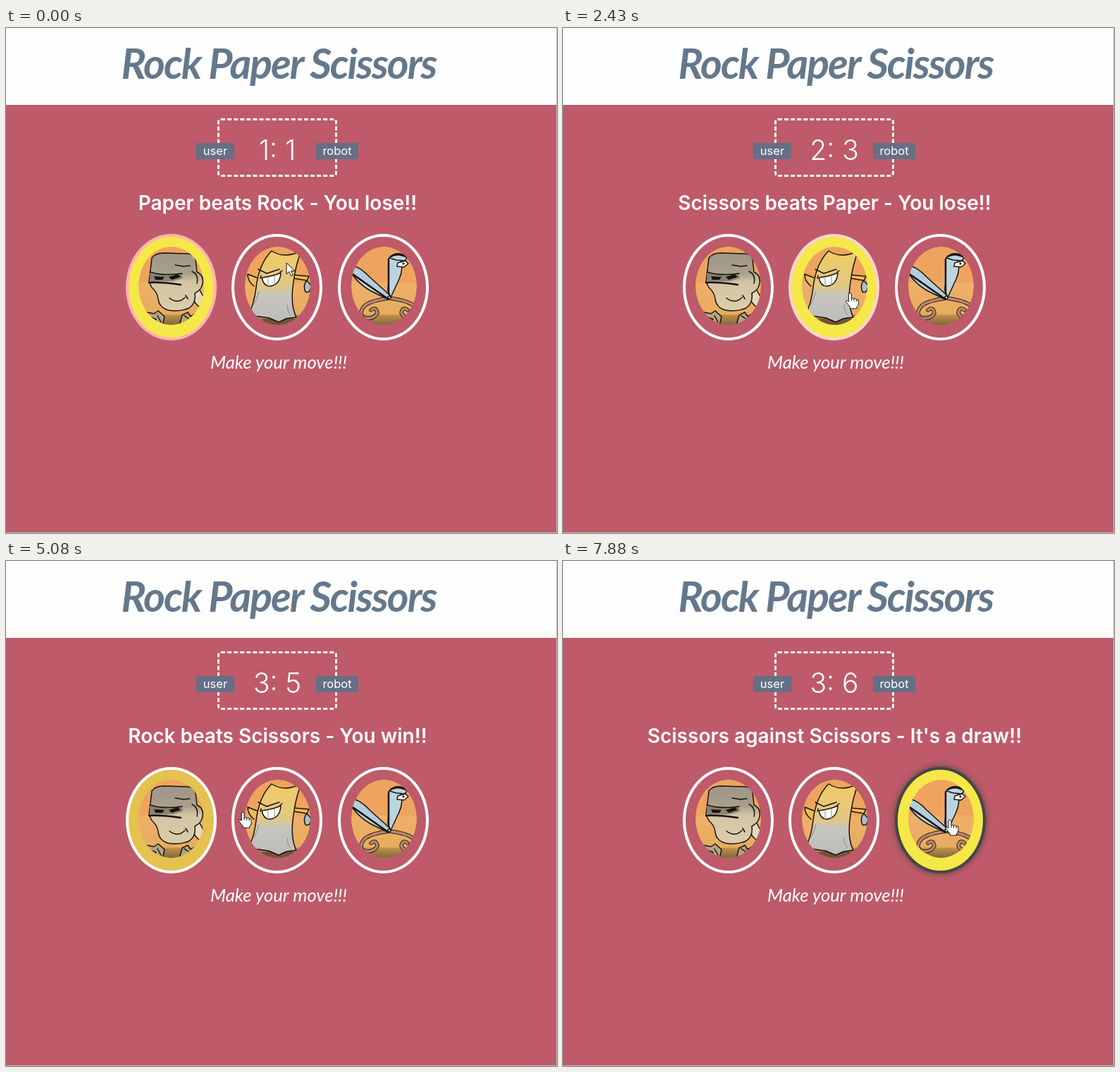
An HTML page that plays this animation: 782 by 716 pixels, repeating every 8000 ms.

```html
<!DOCTYPE html>
<html lang="en">
<head>
<meta charset="utf-8">
<title>Rock Paper Scissors</title>
<style>
html, body { margin: 0; width: 100%; height: 100%; overflow: hidden; background: #be5a69; }
#stage { position: relative; width: 782px; height: 716px; overflow: hidden; }
#stage > * { position: absolute; box-sizing: border-box; }
header { width: 782px; height: 109px; background: #fefefe; }
.board { left: 300px; top: 128px; width: 170px; height: 83px; border: 3px dashed #fff; border-radius: 5px; }
.choice { top: 292px; width: 129px; height: 151px; border: 4px solid #fff; border-radius: 50%; }
svg { left: 0; top: 0; }
text { fill: #fff; text-anchor: middle; font: 600 28px Inter, sans-serif; }
.script { font: italic 25.7px Caveat, Lato, cursive; }
#title { fill: #64788c; font-size: 59px; font-weight: 700; letter-spacing: -2px; }
#score { font-size: 39px; font-weight: 300; }
.label { font-size: 16.5px; font-weight: 400; }
.ink { stroke: #17130f; stroke-width: 1.5; stroke-linejoin: round; stroke-linecap: round; }
.line { fill: none; }
</style>
</head>
<body>
<div id="stage">
  <header></header>
  <div class="board"></div>
  <div class="choice" style="left:170px"></div>
  <div class="choice" style="left:320px"></div>
  <div class="choice" style="left:471px"></div>
  <svg width="782" height="716" viewBox="0 0 782 716">
    <defs>
      <linearGradient id="sky" x2="0" y2="1">
        <stop offset=".46" stop-color="#eea45e"/><stop offset=".46" stop-color="#efb06a"/>
        <stop offset=".86" stop-color="#e7ac5e"/><stop offset=".88" stop-color="#bd8c48"/>
        <stop offset="1" stop-color="#80683d"/>
      </linearGradient>
      <linearGradient id="stone" x2="0" y2="1">
        <stop offset=".1" stop-color="#a1988a"/><stop offset=".36" stop-color="#aaa08c"/>
        <stop offset=".5" stop-color="#d3c5a3"/><stop offset="1" stop-color="#dccdaa"/>
      </linearGradient>
      <linearGradient id="sheet" x2="0" y2="1">
        <stop offset=".1" stop-color="#eecb69"/><stop offset=".5" stop-color="#e0c885"/>
        <stop offset=".62" stop-color="#c7c5c0"/><stop offset="1" stop-color="#bcbcbc"/>
      </linearGradient>
      <ellipse id="oval" cx="46.5" cy="55.5" rx="46.5" ry="55.5"/>
      <clipPath id="frame"><use href="#oval"/></clipPath>
      <path id="grip" d="M54 73Q30 76 20 83Q9 94 18 101Q32 104 37 94Q35 84 28 90M54 73Q78 76 88 83Q97 94 89 101Q76 104 71 94Q73 84 80 90"/>
    </defs>

    <text id="title" class="script" x="387" y="72">Rock Paper Scissors</text>
    <g fill="#656f86"><rect x="270" y="163" width="54" height="23"/><rect x="440" y="163" width="60" height="23"/></g>
    <text class="label" x="297" y="180">user</text>
    <text class="label" x="470" y="180">robot</text>
    <text id="score" x="385" y="187"></text>
    <text id="result" x="385.5" y="258"></text>
    <text class="script" x="387" y="483">Make your move!!!</text>

    <!-- rock -->
    <g transform="translate(188 310)" clip-path="url(#frame)">
      <use href="#oval" fill="url(#sky)"/>
      <path class="ink" fill="#b5a483" d="M6 92L22 95L28 91L37 99L34 112H8ZM62 97L70 93L74 99L86 92L84 112H58Z"/>
      <path class="ink" fill="#e6d8ba" d="M78 64Q74 78 90 88L95 76L86 60Z"/>
      <path class="ink" fill="url(#stone)" d="M19 16Q24 9 36 9L70 10Q80 11 81 18L83 36Q93 40 91 52Q90 61 80 66Q82 80 72 87Q58 93 42 90Q29 86 28 74Q27 65 19 58L15 50Z"/>
      <path fill="#8b8271" d="M16 37Q36 42 61 37L63 45L49 49L17 50Z"/>
      <path class="ink line" d="M16 36Q36 42 62 38M52 26L64 28L73 27M76 35Q86 40 83 52M44 73Q56 82 66 72M67 69L70 74"/>
      <path class="ink line" style="stroke-width:2.5" d="M15 51Q33 50 60 54"/>
      <path fill="#17130f" d="M22 42L37 43L34 47L24 47ZM43 43L56 39L60 43L47 47Z"/>
      <path class="ink line" d="M12 98L25 103L20 110M27 98L32 107M65 98L74 104L80 97"/>
    </g>

    <!-- paper -->
    <g transform="translate(339 310)" clip-path="url(#frame)">
      <use href="#oval" fill="url(#sky)"/>
      <ellipse cx="49" cy="106" rx="33" ry="5" fill="#715337"/>
      <path class="ink" fill="#eebc54" d="M17 44L4 39Q4 49 13 56M68 40L91 42L88 48L70 45"/>
      <path class="ink" fill="#a9c0c9" d="M88 48Q82 55 86 64Q93 67 94 55Z"/>
      <path class="ink" fill="url(#sheet)" d="M38 6Q56 18 80 6Q72 26 69 50Q64 82 73 100L59 102L48 107L34 101L5 97Q13 82 16 58Q20 24 38 6Z"/>
      <path class="ink" fill="#fff" d="M24 44Q40 42 51 37Q50 54 36 56Q27 57 24 44Z"/>
      <path class="ink line" d="M19 32L31 38L49 32M23 41L22 45M50 36L53 34"/>
      <path class="line" stroke="#8c8881" d="M33 44L33 56M42 41L42 55M12 83Q17 76 20 63M60 82Q60 92 65 97"/>
    </g>

    <!-- scissors -->
    <g transform="translate(490 310)" clip-path="url(#frame)">
      <use href="#oval" fill="url(#sky)"/>
      <g class="line" stroke-linecap="round">
        <use href="#grip" stroke="#31231c" stroke-width="5.5"/>
        <use href="#grip" stroke="#b98970" stroke-width="3.4"/>
      </g>
      <path class="ink" fill="#b5cdd9" d="M-1 27Q12 28 26 43L56 70L51 74L36 67Q15 58 2 40Z"/>
      <path class="ink" fill="#bcd4de" d="M53 17Q61 10 69 16Q75 31 68 46L56 72L52 62Q54 38 53 17Z"/>
      <path class="ink line" style="stroke-width:2.5" d="M2 39L52 74M53 18L53 66"/>
      <path class="ink" fill="#bcd4de" d="M54 16Q61 7 73 11L80 15L76 20L64 19Z"/>
      <path class="ink" fill="#fff" d="M66 23L77 20L81 24L75 29L65 28Z"/>
      <path class="ink line" style="stroke-width:2.5" d="M56 14Q66 8 79 15"/>
      <circle cx="74" cy="24" r="1.5"/>
      <circle cx="54" cy="72" r="2" class="ink" fill="#e4e4df"/>
    </g>

    <g id="cursor" fill="#fff" stroke="#111" stroke-linejoin="round">
      <path id="arrow" d="M0 0V16L3.8 12.5L6.5 18.5L9.2 17.3L6.6 11.5H12Z"/>
      <path id="hand" d="M-2 1.5Q-2 0 0 0Q2 0 2 1.5V7.5Q4 6 5.5 8Q7.8 6.8 9 9Q12 8 12 11V15Q12 18 9.5 20V22H0V19.5Q-3 16 -6 12Q-6 9 -2 12ZM2 7.5V11M5.5 8V11.5M9 9V12"/>
    </g>
    <path d="M781.5 0V716M0 715.5H782" stroke="#cdb9bd"/>
  </svg>
</div>
<script>
const LOOP = 8000;
const WHITE = [255, 255, 255], RED = [252, 18, 27], GREEN = [77, 204, 125], GRAY = [70, 70, 71];

// Rounds: start time, score, result line
const rounds = [
  [0, "1: 1", "Paper beats Rock - You lose!!"],
  [780, "2: 1", "Scissors beats Paper - You win!!"],
  [1500, "2: 2", "Scissors beats Paper - You lose!!"],
  [1900, "2: 3", "Scissors beats Paper - You lose!!"],
  [2750, "2: 4", "Paper beats Rock - You lose!!"],
  [3800, "2: 5", "Paper beats Rock - You lose!!"],
  [4530, "3: 5", "Rock beats Scissors - You win!!"],
  [5350, "3: 5", "Paper against Paper - It's a draw!!"],
  [6250, "3: 6", "Scissors beats Paper - You lose!!"],
  [7580, "3: 6", "Scissors against Scissors - It's a draw!!"]
];

// Hover fill and border colour of each choice: [time, ...values]
const choices = [
  {
    hover: [[120, 1], [420, 0], [2520, 0], [2820, 1], [5000, 1], [5300, 0]],
    glow: [[0, 255, 178, 178], [350, ...WHITE], [2750, ...WHITE], [3050, ...RED], [3390, ...WHITE],
      [3800, ...WHITE], [4080, ...RED], [4400, 252, 90, 95], [4530, 208, 140, 112], [4700, ...GREEN], [5050, ...WHITE]]
  },
  {
    hover: [[120, 0], [420, 1], [530, 1], [830, 0], [1170, 0], [1500, 1], [2480, 1], [2780, 0],
      [5080, 0], [5380, 1], [6900, 1], [7200, 0]],
    glow: [[1500, ...WHITE], [1750, ...RED], [1900, 252, 90, 95], [2120, ...RED], [2500, ...WHITE],
      [5350, ...WHITE], [5600, ...GRAY], [6180, ...WHITE], [6250, ...WHITE], [6520, ...RED], [6850, ...WHITE]]
  },
  {
    hover: [[600, 0], [900, 1], [1130, 1], [1500, 0], [7080, 0], [7380, 1]],
    glow: [[780, ...WHITE], [1050, ...GREEN], [1380, ...WHITE], [7580, ...WHITE], [7860, ...GRAY]]
  }
];

const pointer = [[0, 398, 333], [120, 398, 333], [400, 420, 350], [620, 530, 372], [1130, 530, 372],
  [1320, 440, 378], [1500, 408, 376], [2430, 408, 376], [2650, 257, 350], [4950, 257, 350],
  [5200, 408, 362], [6880, 408, 362], [7200, 549, 367]];

const $ = id => document.getElementById(id);
const ovals = document.querySelectorAll(".choice");

function at(keys, t) {
  const next = keys.findIndex(k => k[0] > t);
  if (next === 0) return keys[0].slice(1);
  if (next < 0) return keys[keys.length - 1].slice(1);
  const [t0, ...a] = keys[next - 1], [t1, ...b] = keys[next];
  return a.map((v, i) => v + (b[i] - v) * (t - t0) / (t1 - t0));
}

function draw(now) {
  const t = now % LOOP;
  const [, score, result] = rounds.filter(r => r[0] <= t).pop();
  $("score").textContent = score;
  $("result").textContent = result;
  choices.forEach(({ hover, glow }, i) => {
    const rgb = at(glow, t);
    const strength = Math.min(1, (765 - rgb[0] - rgb[1] - rgb[2]) / 480) ** 2;
    const style = ovals[i].style;
    style.backgroundColor = `rgba(245,232,72,${at(hover, t)[0]})`;
    style.borderColor = `rgb(${rgb})`;
    style.boxShadow = `0 0 8px rgba(${rgb},${strength})`;
  });
  $("cursor").setAttribute("transform", `translate(${at(pointer, t)})`);
  $("arrow").style.display = t < 120 ? "" : "none";
  $("hand").style.display = t < 120 ? "none" : "";
  requestAnimationFrame(draw);
}
requestAnimationFrame(draw);
</script>
</body>
</html>
```
